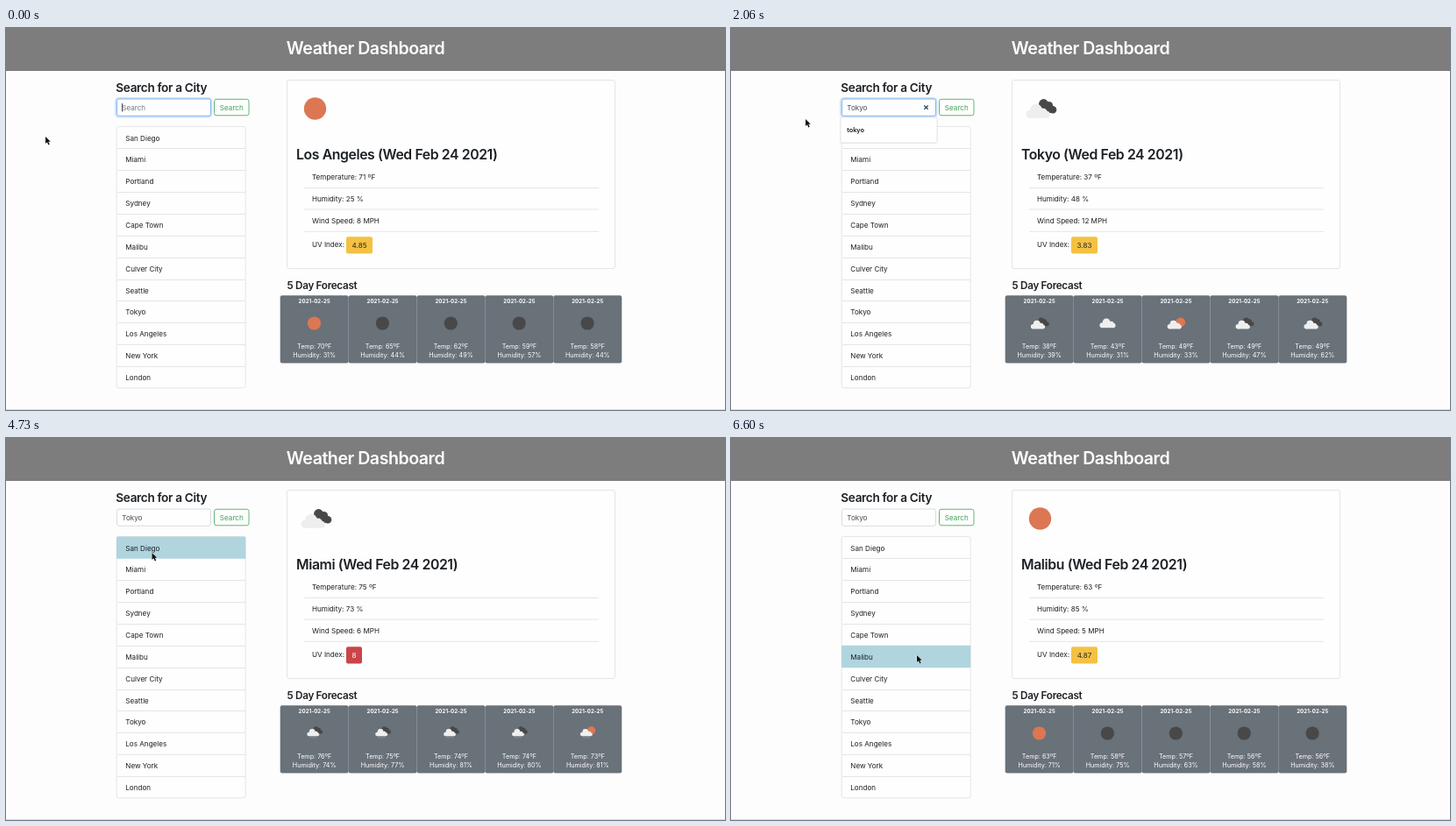
Recreate the animation shown at these times as an HTML page. Size 820 by 436 pixels, loop 6660 ms.

```html
<!DOCTYPE html>
<html lang="en">
<head>
<meta charset="utf-8">
<title>Weather Dashboard</title>
<style>
  html, body { margin: 0; width: 100%; height: 100%; overflow: hidden; background: #fdfdfd; }
  svg { display: block; font: 8.1px Inter, "Open Sans", sans-serif; fill: #1c2024; }
  .head { font-weight: 560; letter-spacing: -0.025em; }
  .mid { text-anchor: middle; }
  .date { font-size: 6.1px; font-weight: 700; letter-spacing: 0.01em; }
  .small { font-size: 7.2px; }
</style>
</head>
<body>
<svg id="stage" width="820" height="436" viewBox="0 0 820 436"></svg>
<script>
const LOOP = 6660, STEP = 1000 / 15;
const ROW = 24.86, LIST_TOP = 112.5;
const RULE = "#e5e5e5";
const CITIES = ["San Diego", "Miami", "Portland", "Sydney", "Cape Town", "Malibu",
  "Culver City", "Seattle", "Tokyo", "Los Angeles", "New York", "London"];

// icons: s sun, n night, c cloud, b broken clouds, p sun + cloud, r rain, q sun + rain
const REPORTS = [
  { at: 0, city: "Los Angeles", icon: "s", temp: 71, hum: 25, wind: 8, uv: "4.85",
    icons: "snnnn", temps: [70, 65, 62, 59, 58], hums: [31, 44, 49, 57, 44] },
  { at: 1730, city: "Tokyo", icon: "b", temp: 37, hum: 48, wind: 12, uv: "3.83",
    icons: "bcpbb", temps: [38, 43, 49, 49, 49], hums: [39, 31, 33, 47, 62] },
  { at: 3800, city: "Miami", icon: "b", temp: 75, hum: 73, wind: 6, uv: "8",
    icons: "rrrrq", temps: [76, 75, 74, 74, 73], hums: [74, 77, 81, 80, 81] },
  { at: 5130, city: "San Diego", icon: "p", temp: 68, hum: 68, wind: 6, uv: "5.02",
    icons: "snnnn", temps: [66, 62, 60, 58, 58], hums: [60, 68, 71, 75, 70] },
  { at: 6400, city: "Malibu", icon: "s", temp: 63, hum: 85, wind: 5, uv: "4.87",
    icons: "snnnn", temps: [63, 58, 57, 56, 56], hums: [71, 75, 63, 58, 38] }
];
const KEYSTROKES = [500, 800, 930, 1070, 1200];
const RELOADS = [[3520, 3800], [4930, 5130], [6265, 6400]];
const MOUSE = [[0, 45, 124], [1600, 45, 124], [2000, 85, 104], [2200, 85, 104],
  [2900, 164, 155], [4130, 164, 155], [4600, 166.5, 131], [4900, 166.5, 131],
  [5000, 167, 128.5], [5600, 167, 128.5], [6130, 212, 248], [LOOP, 212, 248]];

const text = (x, y, s, cls = "", attrs = "") =>
  `<text x="${x}" y="${y}" class="${cls}" ${attrs}>${s}</text>`;
const rect = (x, y, w, h, attrs) => `<rect x="${x}" y="${y}" width="${w}" height="${h}" ${attrs}/>`;
const line = (x1, x2, y, color = RULE) => `<path d="M${x1} ${y}H${x2}" stroke="${color}"/>`;
const disc = (x, y, r, fill) => `<circle cx="${x}" cy="${y}" r="${r}" fill="${fill}"/>`;
const outline = c => `rx="2.5" fill="#fefefe" stroke="${c}"`;
const ease = p => p * p * (3 - 2 * p);

function mouseAt(t) {
  const i = MOUSE.findIndex(m => m[0] > t);
  const [t0, x0, y0] = MOUSE[i - 1], [t1, x1, y1] = MOUSE[i];
  const p = ease((t - t0) / (t1 - t0));
  return [x0 + (x1 - x0) * p, y0 + (y1 - y0) * p];
}

function cloud(x, y, size, fill) {
  return `<g transform="translate(${x} ${y}) scale(${size})" fill="${fill}">
    <circle cx="-9.5" cy="3.5" r="4.7"/><circle cx="-2" cy="-1.8" r="7"/>
    <circle cx="6.5" cy="1.5" r="5"/><circle cx="10.3" cy="4" r="4.2"/>
    <rect x="-9.5" y="2" width="19.8" height="6.2"/></g>`;
}

function darkCloud(fill) {
  return disc(4, -5.5, 5.4, fill) + disc(10, -3.5, 4.6, fill) +
    disc(14.5, 1.2, 4.3, fill) + disc(9, 1.5, 4, fill);
}

function icon(kind, x, y, size, light) {
  const sun = "#dd7753", dark = "#484848";
  const wet = "rq".includes(kind);
  let s = "";
  if (kind === "s") s = disc(0, 0, 12.7, sun);
  else if (kind === "n") s = disc(0, 0, 12.7, dark);
  else if (kind === "c") s = cloud(0, 0, 1.05, light);
  else {
    s = "pq".includes(kind) ? disc(9, -2, 9, sun) : darkCloud(dark);
    s += cloud(-2.6, 3, 0.95, light);
    if (wet) for (let i = 0; i < 4; i++)
      s += `<path d="M${-8 + i * 4} ${12 + i % 2}l-1 3" stroke="${light}" opacity=".5"/>`;
  }
  const place = wet ? `translate(${x} ${y - 2.2}) scale(${size * 0.85})` : `translate(${x} ${y}) scale(${size})`;
  return `<g transform="${place}">${s}</g>`;
}

function searchBox(t) {
  const focus = t < 3520;
  const typed = "Tokyo".slice(0, KEYSTROKES.filter(k => k <= t).length);
  let s = text(125.3, 73, "Search for a City", "head", 'font-size="13.6"');
  if (focus) s += rect(125, 80, 109.5, 21.5, 'rx="3.5" fill="none" stroke="#cfe3fb" stroke-width="2"');
  s += rect(126.5, 81, 107, 19.3, outline(focus ? "#80b5f3" : "#d8dbde"));
  const caretOn = focus && (t < 1200 || (t - 1200) % 1000 < 500);
  const caret = caretOn ? '<tspan fill="#222" font-weight="300" dx="-.6">|</tspan>' : "";
  s += typed
    ? text(132.3, 93.8, typed + caret, "", 'fill="#42484e"')
    : text(132.3, 93.8, "Search", "", 'fill="#747b82"') +
      (caretOn ? '<path d="M132.5 86V95.5" stroke="#222" stroke-width=".8"/>' : "");
  if (typed && focus)
    s += '<path d="M220.3 88.5l4.4 4.4m0-4.4l-4.4 4.4" stroke="#2d4258" stroke-width="1.3"/>';
  s += rect(237.5, 81.3, 39.5, 18.5, outline("#62b676"));
  return s + text(257.3, 93.8, "Search", "mid", 'fill="#3f9f57"');
}

function cityList(t, hover) {
  if (hover === null) return line(126, 274, 113, "#d4d4d4");
  let s = rect(126.2, LIST_TOP, 147, ROW * 12, outline(RULE));
  CITIES.forEach((name, i) => {
    const y = LIST_TOP + ROW * i;
    if (i === hover) s += rect(126, y, 147.3, ROW + 0.5, 'rx="1" fill="#b0d5df"');
    else if (i && i - 1 !== hover) s += line(127, 273, Math.round(y) + 0.5);
    s += text(136.3, y + 16, name);
  });
  return s;
}

function suggestion() {
  return rect(124.5, 102.5, 111, 29.5, 'rx="2" fill="#000" opacity=".07"') +
    rect(125, 102, 110, 29, 'rx="1.5" fill="#fff" stroke="#dcdcdc" stroke-width=".7"') +
    text(132.2, 118.8, "tokyo", "", 'font-size="7.3" font-weight="600"');
}

function badge(uv) {
  const v = +uv, w = uv.length > 1 ? 30 : 18;
  const [fill, ink] = v >= 8 ? ["#cb444a", "#fff"] : v >= 5 ? ["#e08a3c", "#a3845c"] : ["#f5c142", "#212529"];
  return rect(388, 238.2, w, 19.3, `rx="2" fill="${fill}"`) +
    text(388 + w / 2, 250.9, uv, "mid", `fill="${ink}"`);
}

function today(r) {
  const rows = [`Temperature: ${r.temp} ºF`, `Humidity: ${r.hum} %`, `Wind Speed: ${r.wind} MPH`, "UV Index:"];
  const base = [173, 197.8, 222.6, 250.3];
  return rect(320.5, 59.5, 374, 215, outline(RULE)) +
    icon(r.icon, 352.5, 92, 1, "#eeeeee") +
    text(331, 150, `${r.city} (Wed Feb 24 2021)`, "head", 'font-size="15.8"') +
    rows.map((row, i) => text(349, base[i], row)).join("") +
    [182.5, 207, 232.3].map(y => line(340, 676, y)).join("") + badge(r.uv);
}

function forecast(r) {
  let s = text(320.5, 298.3, "5 Day Forecast", "head", 'font-size="11.7"');
  for (let i = 0; i < 5; i++) {
    const x = 312.7 + 77.9 * i, c = x + 39;
    s += rect(x, 305.3, 78, 77.2, 'rx="2.2" fill="#697179"') + '<g fill="#fff">' +
      text(c, 313.9, "2021-02-25", "mid date") +
      text(c, 365.8, `Temp: ${r.temps[i]}ºF`, "mid small") +
      text(c, 376.2, `Humidity: ${r.hums[i]}%`, "mid small") + "</g>" +
      icon(r.icons[i], c - 0.2, 337, 0.6, "#efefef");
  }
  return s;
}

function pointer(t, x, y) {
  const beam = t >= 4990 && t < 5650;
  const d = beam ? "M-1.8 -4.5Q0 -4.5 0 -3Q0 -4.5 1.8 -4.5M0 -3V3M-1.8 4.5Q0 4.5 0 3Q0 4.5 1.8 4.5M-1 1H1"
    : "M0 0V8L1.9 6.3L3.3 9.4L4.7 8.8L3.3 5.8H5.8Z";
  const paint = beam ? 'fill="none" stroke="#222" stroke-width=".9"'
    : 'fill="#111" stroke="#fff" stroke-width=".9" paint-order="stroke"';
  return `<path transform="translate(${x} ${y})" d="${d}" ${paint}/>`;
}

function scene(t) {
  const report = REPORTS.filter(r => r.at <= t).pop();
  const [x, y] = mouseAt(t);
  const open = t >= KEYSTROKES[0] && t < 2270;
  const empty = RELOADS.some(([a, b]) => t >= a && t < b);
  const inside = !open && x > 126 && x < 273 && y > LIST_TOP;
  const hover = empty ? null : inside ? Math.floor((y - LIST_TOP) / ROW) : -1;
  return rect(0, 0, 820, 436, 'fill="#fdfdfd"') +
    rect(0, 0, 820, 49, 'fill="#7d7d7d"') +
    text(410, 30, "Weather Dashboard", "head mid", 'font-size="19.6" fill="#fff"') +
    rect(0, 435, 820, 1, 'fill="#dcdcdc"') +
    searchBox(t) + cityList(t, hover) + (open ? suggestion() : "") +
    today(report) + forecast(report) + pointer(t, x, y);
}

const stage = document.getElementById("stage");
const start = performance.now();
let shown = -1;
function tick() {
  const t = (performance.now() - start) % LOOP;
  const step = Math.min(99, Math.floor((t + 7) / STEP));
  if (step !== shown) {
    shown = step;
    stage.innerHTML = scene(step * STEP);
  }
  requestAnimationFrame(tick);
}
tick();
</script>
</body>
</html>
```
